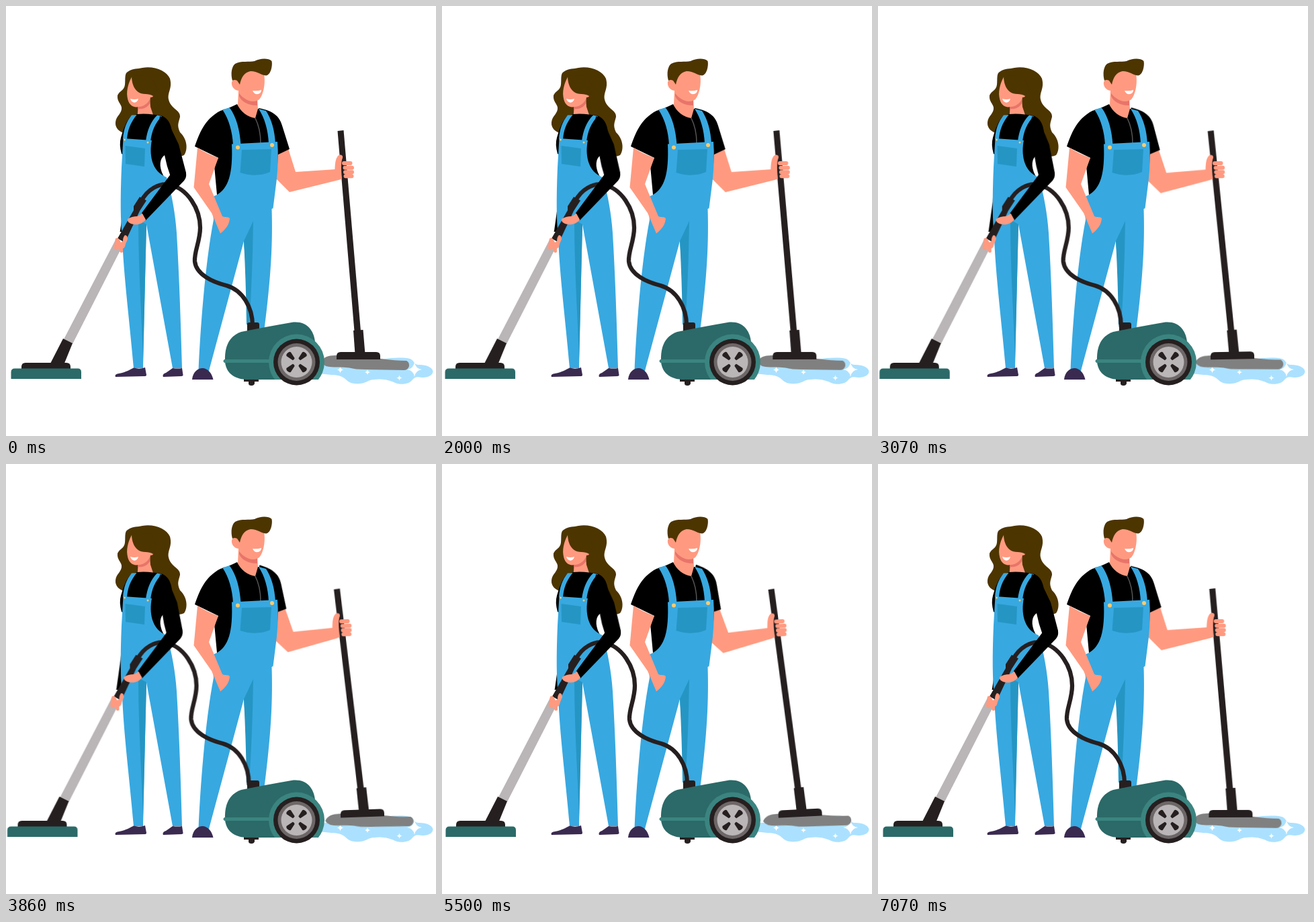
An HTML page for the animation above (7.14 s loop, 640x640 px).

```html
<!DOCTYPE html>
<html lang="en">
<head>
<meta charset="utf-8">
<title>Cleaning team</title>
<style>
  html, body { margin: 0; width: 100%; height: 100%; overflow: hidden; background: #fff; }
  svg { display: block; width: 100%; height: 100%; }
  .blue { fill: #38a8e0; }
  .shade { fill: #2596c4; }
  .skin { fill: #ff9a80; }
  .blush { fill: #e8746a; }
  .hair { fill: #4d3500; }
  .dark { fill: #261f20; }
  .teal { fill: #2b6a68; }
  .mint { fill: #3b8480; }
  .shoe { fill: #3a2a50; }
  .gold { fill: #f8cb70; }
  .white { fill: #fff; }
  .line { fill: none; stroke-linecap: round; }

  .slide { animation: slide 3.57s cubic-bezier(.45, 0, .65, .95) infinite alternate; }
  .lean { transform-origin: 0 172px; animation: lean 3.57s cubic-bezier(.45, 0, .65, .95) infinite alternate; }
  .sweep { transform-origin: 510px 348px; animation: sweep 7.14s infinite; }
  .sleeve { transform-origin: 393px 165px; animation: sleeve 7.14s infinite; }

  @keyframes slide { to { transform: translateX(-5.7px); } }
  @keyframes lean { to { transform: skewX(-4deg); } }
  @keyframes sweep {
    0%, 21.3% { transform: rotate(0deg); animation-timing-function: cubic-bezier(.4, 0, .6, 1); }
    75% { transform: rotate(-2.9deg); animation-timing-function: cubic-bezier(.45, .1, .8, .75); }
    100% { transform: rotate(0deg); }
  }
  @keyframes sleeve {
    0%, 21.3% { transform: rotate(0deg); animation-timing-function: cubic-bezier(.4, 0, .6, 1); }
    75% { transform: rotate(8deg); animation-timing-function: cubic-bezier(.45, .1, .8, .75); }
    100% { transform: rotate(0deg); }
  }
</style>
</head>
<body>
<svg viewBox="0 0 640 640">
  <defs>
    <path id="star" d="M0-10Q1.2-1.2 10 0Q1.2 1.2 0 10Q-1.2 1.2-10 0Q-1.2-1.2 0-10Z"/>
    <path id="spoke" d="M-2-6Q0-5 2-6L4.300-16.500Q4-19 0-19Q-4-19-4.300-16.500Z"/>
    <clipPath id="floor"><path d="M380 480H480V556H380Z"/></clipPath>
  </defs>

  <!-- puddle -->
  <path fill="#abe1ff" d="M466 535L560 526C575 523 592 523 601 525C609 528 606 534 615 534C626 534 635 538 635.500 544C635 551 626 554 615 552.500C606 551 606 558 599 561C590 564 582 563 575 559C565 555 556 555 547 556C538 557 535 562 526 562C515 563 510 560 506 556C500 550 492 549 484 549L466 547Z"/>
  <g class="white">
    <use href="#star" transform="translate(497.500 541.500) scale(.5)"/>
    <use href="#star" transform="translate(538 545) scale(.42)"/>
    <use href="#star" transform="translate(585.500 553.500) scale(.42)"/>
    <use href="#star" transform="translate(608 541) scale(1.1)"/>
  </g>

  <!-- mop and the arm holding it -->
  <g class="sweep">
    <path fill="#808080" d="M469 530C472 522 481 519.500 493 520L558 525Q580 528 596 528Q600.500 530 600 536Q598 542 592 542L535 541Q520 541 511 538.500Q500 537 490 537.500Q473 538 469 530Z"/>
    <path class="skin" d="M398 212L420 212L431 247L491 243L504 238V255L495 259L422 277L400 255Z"/>
    <path class="dark" d="M493.500 186L502.500 185L528 484H518.500Z"/>
    <path class="dark" d="M517 483L531.500 482L534.500 518H519.500Z"/>
    <path class="dark" d="M492 526V521Q492 515 498 515H551Q557 515 557 521V526Z"/>
    <path class="skin" d="M489 248C490 238 489 226 496 221.500Q502 221 501 226C498 233 499 245 500 257L494 259Z"/>
    <path class="line" stroke="#ff9a80" stroke-width="6" d="M503 234H512.500M504.500 240.700H515M505 247.300H515M505.500 253.300H514.500"/>
  </g>

  <!-- man -->
  <path class="sleeve" d="M376 152C392 155 406 160 411 178L422 213L401 223L372 210Z"/>
  <path class="skin" d="M346 126L345 147L350 170H376L374 136Z"/>
  <path d="M344 146C349 157 359 165 371 167L375 153C384 154 392 157 398 162L405 215L404 235L330 284L314 281L310 238L316 226L281 209C288 189 296 168 319 156Q330 153 344 146Z"/>
  <path class="line" stroke="#555" stroke-width="1.500" d="M371 167C376 177 379 190 379 204"/>
  <path class="blue" d="M336 205.500L404 202Q406 228 403 257L397.500 301L395.500 302C397 350 395 400 384 485H359Q358 400 354 350L302 543H286.500C289 485 296 385 309 318L305 285L314 281C331 271 338 250 336 205.500Z"/>
  <path class="shade" d="M368 320L354 350Q357 405 358 474H362Q367 400 368 320Z"/>
  <path class="blue" d="M322 154L333 151.500C343 166 348 184 349.500 207H338C337 187 332 169 322 154ZM376 153L387 156C395 168 400 185 401 205H391C390 184 385 167 376 153Z"/>
  <path class="shade" d="M351 214L395 213L393 247C381 253 362 253 348.500 248Z"/>
  <circle class="gold" cx="345" cy="210.500" r="3"/>
  <circle class="gold" cx="396" cy="207" r="3"/>
  <path class="skin" d="M285 211L279.500 270L306 308L319 338.500C326 333 332 327 333 316C330 313 326 315 322 313L302 265L316 226Q299 220 285 211Z"/>
  <path class="blush" d="M347 130C355 140 364 142 374 139L374 148C360 148 350 142 347 134Z"/>
  <path class="skin" d="M350 92H381Q385 96 384.500 104C386 117 383 132 377 139C367 147 350 138 346 126C339 125 335 119 336 113Q340 106 347 106Z"/>
  <path class="hair" d="M337 111C334 101 336 90 341 86C350 81 362 84 370 82C378 78 390 77 395.500 82C397 89 394 103 387 103.500C379 103 375 97 364 97C354 99 350 107 348 117L344 111Q340 109 337 111Z"/>
  <path class="white" d="M367 126Q374 127 380 125C380 132 370 134 367 126Z"/>
  <path class="shoe" d="M277 556C278 545 285 539 293 539C301 540 306 546 308.500 556Z"/>

  <!-- woman -->
  <path class="hair" d="M181 98C190 92 196 94 203 92C222 89 239 97 244 108C248 123 240 128 242 139C245 153 260 155 259 165C257 174 254 177 259 188C270 198 271 214 265 222Q250 230 230 200L180 190C169 189 162 181 163 173C164 163 173 160 172 151C171 145 165 142 166 133C169 126 176 126 177 117C178 109 176 101 181 98Z"/>
  <path class="slide" d="M179 270L170 334L169.500 336H178L190 280Z"/>
  <path class="skin" d="M197 146L195.500 165H220L215 150L214 137Z"/>
  <path d="M195 161Q207 160 219 161.500L231 163Q245 168 247 188L236 222C229 227 227 238 234 252L238 258L172 220Q168 206 171 196C175 182 179 171 186 164Z"/>
  <path class="blue" d="M174.500 197L217 200C213 220 216 246 239 255C247 280 252 310 254 338C258 405 260 470 262 539H248L209 325L204 539H190C184 470 175 400 173 345Q169 310 172 240Z"/>
  <path class="shade" d="M197 318L209 325L204 525C203 480 197 400 197 318Z"/>
  <path class="blue" d="M187 162.500L194.500 162C185 174 181 185 180 199L174 198C175 184 179 172 187 162.500ZM225 162.500L232 164C222 174 217 186 215 202L208 201C210 186 215 172 225 162.500Z"/>
  <path class="shade" d="M177.500 208L207 212L206 239L178 235Z"/>
  <circle class="gold" cx="176.500" cy="199" r="1.500"/>
  <circle class="gold" cx="211" cy="203" r="1.500"/>
  <path class="blush" d="M197 148C206 148 211 143 215 136L214 145C210 152 203 154 196 153Z"/>
  <path class="skin" d="M188 104C183 113 179 124 180.500 135C182 148 190 152 198 150C207 149 213 143 215 136Q220 136 219 132L205 115Z"/>
  <path class="hair" d="M187 104C187 114 190 123 196 127.500C203 133 212 129 219 134L225 122L215 103Z"/>
  <path class="white" d="M185 138Q191 140 197 138C195 146 187 145 185 138Z"/>
  <path class="shoe" d="M163 552Q161 548 168 547C179 545 185 541 190 538.500Q199 541 207 538L209 549Q209 551 206 551ZM234 552Q232 548 238 546L248 539Q256 540 262 539L263.500 549Q264 551 261 551Z"/>

  <!-- hose and wand -->
  <g class="slide">
    <path class="line" stroke="#261f20" stroke-width="6.300" d="M201 291C210 273 228 263 243 266C270 271 289 302 289 330C289 350 280 365 281 380C283 400 308 411 328 416C352 423 367 448 367 476"/>
    <path class="dark" d="M199 284L209 289.500L199 305L177 352L166 346L190 304V298Z"/>
    <path fill="#bab5b6" d="M163 348L175 354L99 503L86 496Z"/>
    <path class="dark" d="M85 495L99 502L86 534H65Z"/>
    <path class="dark" d="M23 541V537Q23 531 29 531H90Q96 531 96 537V541Z"/>
    <path class="teal" d="M7.500 555V545Q7.500 539.500 13 539.500H107Q112 539.500 112 545V555Z"/>
  </g>
  <path class="lean" d="M229 164Q241 168 246 183L257 206L268 248Q269 256 261 260L245 254Q239 238 236 222L225 190Z"/>
  <g class="slide">
    <path d="M246 249L268 249Q269 255 265 260L208 319L202 308Z"/>
    <path class="skin" d="M203 309L208 318C203 324 197 326 190 325C184 324 180 321 181 317Q187 313 196 313Z"/>
    <path class="skin" d="M163 346Q167 344 169 348L171 352L174 350Q174 344 177 341Q181 341 181 347L178 354Q177 360 174 361L174 366Q171 369 169 365L169 360L166 363Q160 364 161 357Z"/>
  </g>

  <!-- vacuum cleaner -->
  <path class="dark" d="M354 554H376V559H370V562Q369 565 365.500 565Q361 565 361 562V559H354Z"/>
  <path class="dark" d="M359 488V474Q359 471 362 471H374Q377 471 377 474V488Z"/>
  <path class="teal" d="M326 530C325 508 331 492 350 485Q390 477 425 471C447 468 458 482 460 500L455 556H360C342 556 328 548 326 530Z"/>
  <path class="mint" d="M325 526H400V531H325Q322 528.500 325 526Z"/>
  <circle class="mint" cx="432.500" cy="530" r="41.500" clip-path="url(#floor)"/>
  <g transform="translate(432.500 530)">
    <circle class="dark" r="34.500"/>
    <circle fill="#6d6768" r="28"/>
    <circle fill="#bab5b6" r="23"/>
    <g class="dark">
      <use href="#spoke" transform="rotate(45)"/>
      <use href="#spoke" transform="rotate(135)"/>
      <use href="#spoke" transform="rotate(225)"/>
      <use href="#spoke" transform="rotate(315)"/>
    </g>
  </g>
</svg>
</body>
</html>
```
